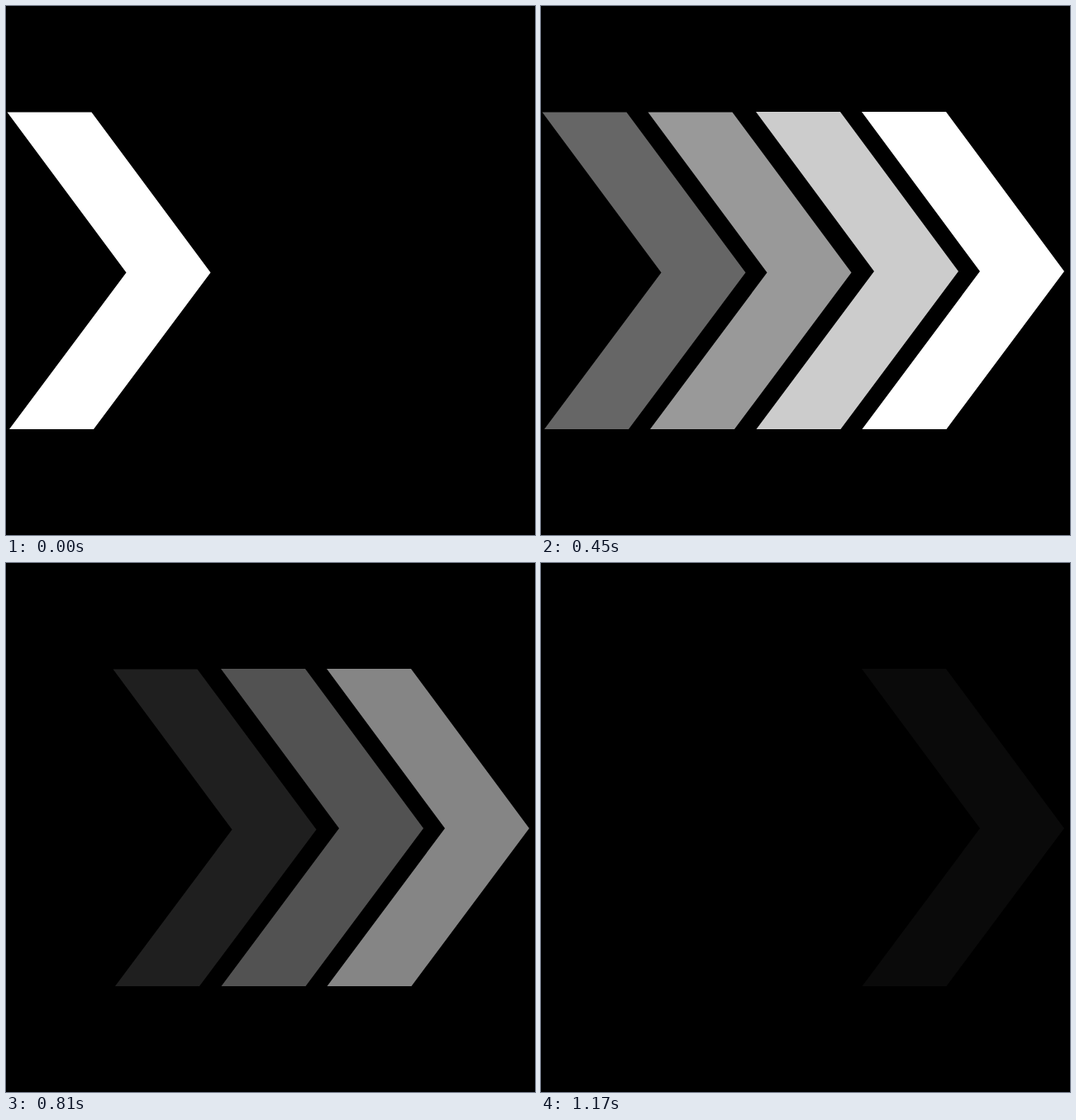
Recreate the animation shown at these times as an HTML page. Size 640 px wide and 640 px high, loop 1.23 s.

```html
<!DOCTYPE html>
<html>
<head>
<meta charset="utf-8">
<style>
html, body { margin: 0; height: 100%; overflow: hidden; background: #000; }
svg { display: block; width: 100%; height: 100%; }
</style>
</head>
<body>
<svg viewBox="0 0 640 640">
  <defs>
    <path id="a" d="M1.5 128.5H103.5L247.5 322.5 106 512H4L145.5 322.5Z"/>
    <path id="b" d="M260 128H362L505 321 362.5 512H260.5L403 321Z"/>
  </defs>
  <g fill="#000">
    <use href="#a"/>
    <use href="#a" x="128"/>
    <use href="#b"/>
    <use href="#b" x="128"/>
  </g>
</svg>
<script>
const LOOP = 1230, GAP = 150, STEP = 60, FADE = 750;
const arrows = document.querySelectorAll('g use');

function draw(now) {
  const t = now % LOOP;
  // Each new arrow restarts the stepped clock
  const last = Math.min(3, Math.floor(t / GAP)) * GAP;
  const time = last + Math.floor((t - last) / STEP) * STEP;
  arrows.forEach((arrow, i) => {
    const age = time - i * GAP;
    const v = age < 0 ? 0 : Math.max(0, Math.round(255 * (1 - age / FADE)));
    arrow.setAttribute('fill', `rgb(${v},${v},${v})`);
  });
}

const start = performance.now();
function tick() {
  draw(performance.now() - start);
  requestAnimationFrame(tick);
}
tick();
</script>
</body>
</html>
```
